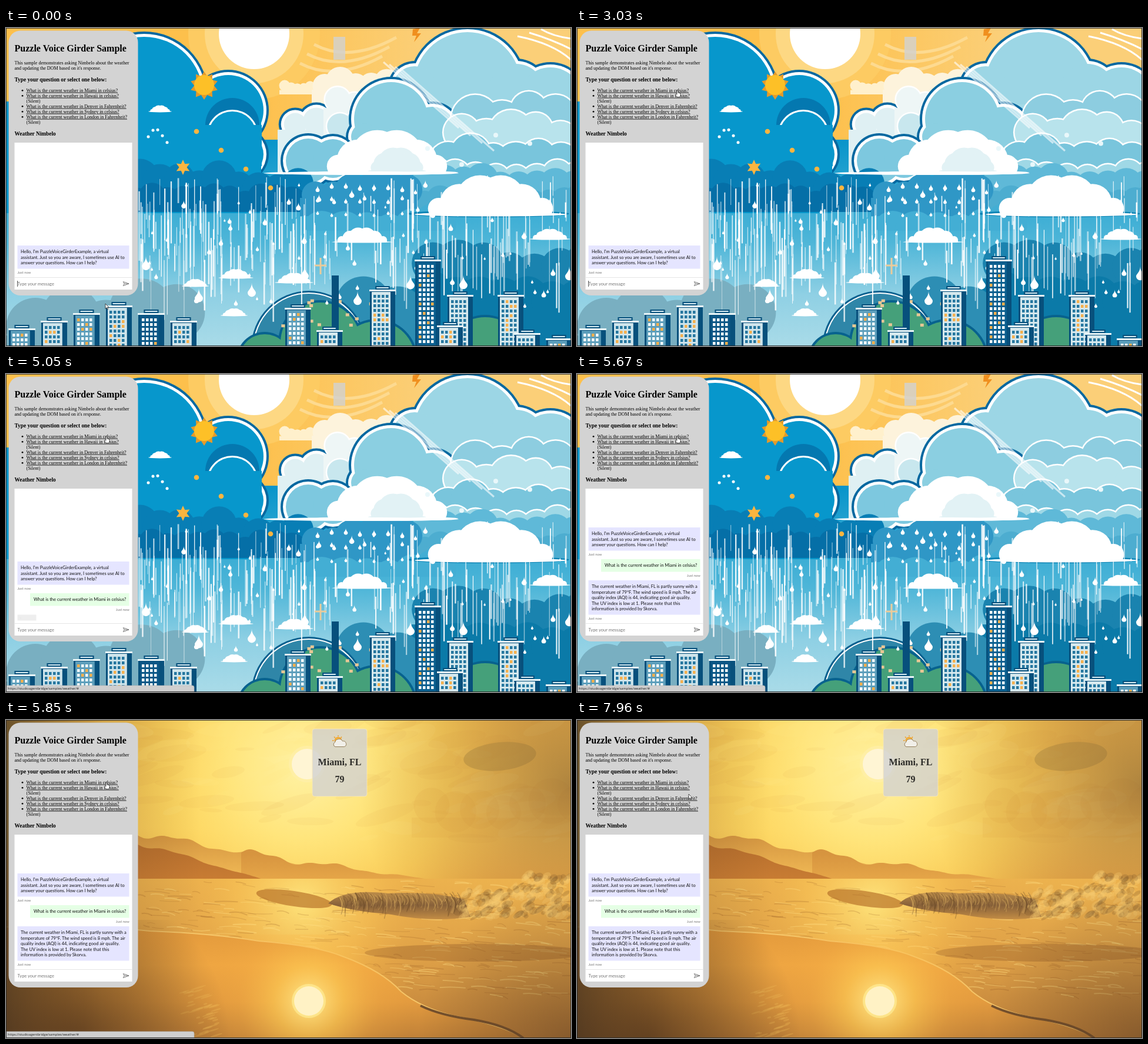
An HTML page with a canvas that plays this animation: 961x541 px, repeating every 8000 ms.

```html
<!DOCTYPE html>
<html lang="en">
<head>
<meta charset="utf-8">
<title>Weather chat sample</title>
<style>
html, body { margin: 0; width: 100%; height: 100%; overflow: hidden; background: #d3d3d3; }
canvas, svg { position: absolute; left: 0; top: 0; width: 961px; height: 541px; }
.serif { font: 8px "Liberation Serif", "Times New Roman", serif; }
.h1 { font-size: 16px; font-weight: bold; }
.h3 { font-size: 9.36px; font-weight: bold; }
.link { text-decoration: underline; }
.chat { font: 7.5px Lato, sans-serif; fill: #111; }
.note { font-size: 5.8px; fill: #767676; }
.hint { fill: #767676; }
.url { font: 5.66px "Open Sans", sans-serif; fill: #222; }
</style>
</head>
<body>
<canvas id="view" width="961" height="541"></canvas>
<svg viewBox="0 0 961 541">
  <defs><clipPath id="log"><rect x="15" y="195" width="199.5" height="229"/></clipPath></defs>
  <rect x="4.5" y="4.5" width="220" height="450.5" rx="20" fill="#d3d3d3"/>
  <g class="serif">
    <text class="h1" x="14.5" y="39.6">Puzzle Voice Girder Sample</text>
    <text x="14.5" y="61.5">This sample demonstrates asking Nimbelo about the weather</text>
    <text x="14.5" y="70.5">and updating the DOM based on it's response.</text>
    <text class="h3" x="14.5" y="90.5">Type your question or select one below:</text>
    <g id="links"></g>
    <text class="h3" x="14.5" y="183.3">Weather Nimbelo</text>
  </g>
  <rect x="14.5" y="195" width="200" height="250" fill="#fff"/>
  <g class="chat">
    <g clip-path="url(#log)">
      <g id="talk">
        <rect x="19.5" y="370" width="190" height="39.5" fill="#e5e5ff"/>
        <text x="25" y="383.1">Hello, I'm PuzzleVoiceGirderExample, a virtual</text>
        <text x="25" y="392.6">assistant. Just so you are aware, I sometimes use AI to</text>
        <text x="25" y="402.1">answer your questions. How can I help?</text>
        <text class="note" x="19.5" y="418">Just now</text>
        <g id="ask">
          <rect x="41" y="424" width="168.5" height="21.5" fill="#e5ffe5"/>
          <text x="47" y="437.3">What is the current weather in Miami in celsius?</text>
          <text class="note" x="209.8" y="454" text-anchor="end">Just now</text>
        </g>
        <g id="typing">
          <rect x="19.5" y="460.5" width="32" height="10" fill="#eee"/>
          <g fill="#d2d2d2"><circle cx="25" cy="466" r="1.5"/><circle cx="35" cy="466" r="1.5"/><circle cx="45" cy="466" r="1.5"/></g>
        </g>
        <g id="reply">
          <rect x="19.5" y="460" width="190" height="58.5" fill="#e5e5ff"/>
          <text x="25" y="473.2">The current weather in Miami, FL is partly sunny with a</text>
          <text x="25" y="482.7">temperature of 79°F. The wind speed is 8 mph. The air</text>
          <text x="25" y="492.2">quality index (AQI) is 44, indicating good air quality.</text>
          <text x="25" y="501.7">The UV index is low at 1. Please note that this</text>
          <text x="25" y="511.2">information is provided by Skorva.</text>
          <text class="note" x="19.5" y="527">Just now</text>
        </g>
      </g>
    </g>
    <path d="M15 424.5H214.5" stroke="#e6e6e6"/>
    <text class="hint" x="19.5" y="437.6">Type your message</text>
    <path d="M199.3 431.6L209 435L199.3 438.6L201.3 435ZM201.3 435H209" fill="none" stroke="#6e6e6e" stroke-width=".9"/>
    <path id="caret" d="M19.5 430V440" stroke="#222" stroke-width=".8"/>
  </g>
  <g id="card">
    <g stroke="#f0a028" stroke-width="1.4">
      <path d="M565 26V28M558 28.5L560 30.5M555 35H557.5M571 28.5L569.5 30.5"/>
      <circle cx="565" cy="35" r="5.5" fill="#fbbd45"/>
    </g>
    <path d="M560 45.5A4 4 0 0 1 559.5 38A7 7 0 0 1 572.5 36A5 5 0 0 1 575.5 45.5Z" fill="#f1efe8" stroke="#8d7550" stroke-width=".9"/>
    <g class="serif" fill-opacity=".8" text-anchor="middle">
      <text class="h1" x="567.5" y="77">Miami, FL</text>
      <text class="h1" x="567.5" y="106">79</text>
    </g>
  </g>
  <g id="status">
    <path d="M0 530H317Q320 530 320 533V541H0Z" fill="#cfcfcf" stroke="#b0b0b0" stroke-width=".6"/>
    <text class="url" x="3" y="537.4">https://studioagentbridge/samples/weather/#</text>
  </g>
  <rect x=".5" y=".5" width="960" height="540" fill="none" stroke="#222" stroke-opacity=".8"/>
  <g id="mouse" fill="#fff" stroke="#111" stroke-width=".7">
    <path id="arrow" d="M0 0V8.5L2 6.7L3.4 9.7L4.7 9.1L3.4 6.2H6Z"/>
    <path id="hand" d="M-1 1Q0 -.7 1 1V5L5 6V10L4 12.4H-1L-4 8Q-3.6 6.4 -1 8Z"/>
  </g>
</svg>
<script>
const W = 961, H = 541, LOOP = 8000;
const { sin, cos, PI, floor, max, min, abs } = Math;
const $ = id => document.getElementById(id);

const links = ['Miami in celsius', 'Hawaii in celsius', 'Denver in Fahrenheit', 'Sydney in celsius', 'London in Fahrenheit'];
let baseline = 108.7;
const line = (s, cls) => {
  const y = baseline;
  baseline += 9;
  return `<text class="${cls}" x="34.5" y="${y}">${s}</text>`;
};
$('links').innerHTML = links.map(s =>
  `<circle cx="28" cy="${baseline - 2.4}" r="1.4"/>` + line(`What is the current weather in ${s}?`, 'link') +
  (/Hawaii|London/.test(s) ? line('(Silent)', '') : '')).join('');

// drawing helpers
let c, seed;
const rnd = () => (seed = (seed * 16807) % 2147483647) / 2147483647;
const span = (a, b) => a + (b - a) * rnd();
const mix = (a, b, p) => a + (b - a) * p;
const times = (n, fn) => { for (let i = 0; i < n; i++) fn(i); };

function scene(draw) {
  const cv = document.createElement('canvas');
  cv.width = W; cv.height = H;
  c = cv.getContext('2d');
  seed = 4711;
  draw();
  return cv;
}
function box(x, y, w, h, fill) { c.fillStyle = fill; c.fillRect(x, y, w, h); }
function oval(x, y, rx, ry, fill, turn = 0) {
  c.fillStyle = fill; c.beginPath(); c.ellipse(x, y, rx, ry, turn, 0, 7); c.fill();
}
const disc = (x, y, r, fill) => oval(x, y, max(r, 0), max(r, 0), fill);
function shape(d, fill, stroke, width = 1) {
  const p = new Path2D(d);
  if (fill) { c.fillStyle = fill; c.fill(p); }
  if (stroke) { c.strokeStyle = stroke; c.lineWidth = width; c.stroke(p); }
}
function ramp(g, cols) {
  cols.forEach((col, i) => g.addColorStop(i / (cols.length - 1), col));
  return g;
}
const down = (y0, y1, ...cols) => ramp(c.createLinearGradient(0, y0, 0, y1), cols);
const across = (x0, x1, ...cols) => ramp(c.createLinearGradient(x0, 0, x1, 0), cols);
const glow = (x, y, r, ...cols) => ramp(c.createRadialGradient(x, y, 0, x, y, r), cols);

// round bumps: each layer is [inset, colour]
function puff(bumps, layers) {
  for (const [inset, col] of layers)
    for (const [x, y, r] of bumps) disc(x, y, r - inset, col);
}
const rim = fill => [[0, '#0568a0'], [4, '#fff'], [9, fill]];
const edged = fill => [[0, '#fff'], [2.5, fill]];
const plain = fill => [[0, fill]];

// row of bumps, solid down to the base
function bank(x0, x1, y, r, layers, base) {
  const bumps = [];
  for (let x = x0 + r; x < x1; x += r * 1.2) bumps.push([x, y + r + span(-.35, .35) * r, r * span(.85, 1.15)]);
  c.save();
  c.beginPath(); c.rect(0, 0, W, base); c.clip();
  puff(bumps, layers);
  box(x0, y + r * 1.5, x1 - x0, H, layers.at(-1)[1]);
  c.restore();
}
// flat-bottomed cloud
function heap(x, base, w, h, fill = '#fff') {
  c.save();
  c.beginPath(); c.rect(0, 0, W, base); c.clip();
  times(6, i => {
    const p = i / 5, r = h * (.26 + .36 * sin(PI * p));
    disc(x + (p - .5) * w * .75, base - r * .6, r, fill);
  });
  c.restore();
  oval(x, base - 1, w * .55, max(1.5, h * .05), fill);
}
function drop(x, y, s) {
  const tip = y - s * 2.4;
  shape(`M${x} ${tip}C${x} ${y - s} ${x + s} ${y - s * .5} ${x + s} ${y}A${s} ${s} 0 0 1 ${x - s} ${y}C${x - s} ${y - s * .5} ${x} ${y - s} ${x} ${tip}Z`, '#fff');
}
function star(x, y, r, n, inner, fill) {
  c.fillStyle = fill;
  c.beginPath();
  times(n * 2, i => {
    const a = i * PI / n - PI / 2, q = i % 2 ? r * inner : r;
    c.lineTo(x + q * cos(a), y + q * sin(a));
  });
  c.fill();
}
function tower(x, y, w, face, pane) {
  box(x - 1, y, w + 2, H, '#07507c');
  box(x + 2, y + 4, w * .78, H, face);
  box(x - 2, y, w + 4, 3, '#eaf6f8');
  box(x + w * .2, y - 6, w * .6, 6, '#07507c');
  box(x + w * .25, y - 4, w * .5, 2, '#d5ebf2');
  for (let yy = y + 9; yy < H - 3; yy += 8)
    for (let xx = x + 5; xx < x + w * .76 - 3; xx += 7)
      box(xx, yy, 4.5, 5, rnd() < .15 ? '#f5b04e' : pane);
}

function rainyCity() {
  // sunny gap
  box(0, 0, W, H, across(420, 720, '#fdc04c', '#fbcf78'));
  disc(422, 10, 112, '#fdcb62');
  disc(422, 10, 84, '#fdd883');
  disc(422, 10, 60, '#fff');
  times(3, i => shape(`M${500 + i * 12} ${60 - i * 16}q60 32 140 -12`, null, '#fdda90', 5));
  shape('M692 2L704 0L699 9H706L694 24L698 13H691Z', '#f08f1e');

  // rain backdrop
  box(0, 190, W, H, down(190, 541, '#0794ca', '#2ea7d2', '#4fb6d8', '#8fd0e4', '#a9dbe8'));

  // pale clouds beside the gap
  bank(465, 560, 92, 9, plain('#fff0cc'), 113);
  bank(520, 700, 72, 22, plain('#fdf3dc'), 190);
  bank(462, 620, 128, 30, rim('#dff0f3'), 248);
  bank(540, 640, 100, 24, edged('#eef6f6'), 240);
  bank(540, 650, 140, 28, edged('#c8e7ee'), 240);

  // large clouds at the right
  puff([[785, 98, 100], [695, 102, 46], [868, 108, 56], [926, 122, 64]], rim('#9cd6e5'));
  box(700, 130, W, 120, '#a3dae7');
  times(3, i => shape(`M${870 + i * 20} ${14 - i * 6}Q930 ${26 - i * 6} 961 ${54 - i * 18}`, null, '#fff', 3));
  puff([[655, 155, 72], [725, 175, 50], [610, 185, 32]], rim('#8bcfe1'));
  times(4, i => bank(760 - i * 20, 1000, 110 + i * 38, 38 - i * 3,
    edged(['#8dcde0', '#b8e3ec', '#79c5dc', '#9fd8e6'][i]), 318));
  bank(690, 1000, 238, 26, plain('#5fb9d8'), 318);
  bank(690, 1000, 275, 22, plain('#4dadd0'), 318);

  // deep blue cloud at the left
  puff([[235, 115, 109], [378, 140, 69], [400, 215, 47]], rim('#0797cc'));
  box(0, 125, 434, 190, '#0797cc');
  puff([[385, 165, 46]], plain('#0478b0'));
  puff([[385, 183, 44]], [[0, '#fff'], [3, '#0797cc']]);
  box(335, 165, 100, 70, '#0797cc');

  puff([[514, 226, 47], [556, 222, 42]], rim('#7dc8df'));
  bank(200, 530, 236, 28, plain('#087eb5'), 313);
  bank(200, 510, 270, 22, plain('#056fa7'), 313);
  bank(500, 700, 250, 26, plain('#2f97c6'), 320);
  bank(505, 730, 306, 32, plain('#43aed4'), 345);

  // white fronts
  heap(648, 247, 220, 76);
  heap(665, 244, 90, 42, '#e2f2f5');
  oval(604, 247, 166, 3, '#fff');
  oval(820, 316, 138, 6, '#0b83b4');
  heap(824, 318, 235, 70);
  times(4, i => shape(`M${642 + i * 10} ${58 + i * 4}L${770 + i * 20} ${170 + i * 13}`, null, 'rgba(255,255,255,.6)', 3));

  // hills
  bank(0, 310, 448, 50, plain('#79afc1'), H);
  bank(690, 1000, 372, 36, plain('#1a83af'), H);
  bank(690, 1000, 425, 34, plain('#0b7aa8'), H);
  bank(560, 700, 430, 48, plain('#2d8eb4'), H);
  puff([[515, 545, 98]], [[0, '#075f8e'], [3, '#fff'], [5, '#2f86a8']]);
  puff([[535, 535, 72], [440, 565, 48], [630, 565, 70], [815, 560, 72]], [[0, '#07628e'], [4, '#45a07a']]);

  // rain, thickest on the left
  times(240, i => {
    const left = i < 140, x = left ? span(224, 525) : span(525, 960), len = span(25, 110);
    box(x, span(250, 400), span(.8, 2.8), len, `rgba(255,255,255,${span(.5, 1)})`);
  });
  times(75, () => drop(span(228, 955), span(265, 475), span(1.5, 4.5)));
  times(9, i => drop(238 + i * 90, 405 + 60 * abs(sin(i * 2)), 7));
  times(7, i => times(3, j => drop(530 + i * 24, 268 + j * 22 + span(0, 8), 3.4 - j * .5)));

  // small clouds and ornaments
  for (const [x, y, w] of [[606, 365, 94], [925, 360, 64], [490, 434, 60], [322, 440, 42], [391, 426, 54], [388, 490, 42], [262, 143, 36]])
    heap(x, y, w, w * .25 + 3);
  times(5, i => disc(242 + i * 8, 185 - 13 * sin(i), 2.5, '#fff'));
  times(4, i => disc(717 + i * 58, 205 + 30 * sin(i * 2), 4, '#e9f7fa'));
  star(337, 98, 24, 10, .7, '#e39a2c');
  disc(337, 97, 17, '#fdc027');
  star(301, 237, 13, 6, .5, '#fbb540');
  times(4, i => disc(324 + i * 42, 176 + i * 32, 4.3, '#fbb540'));
  shape('M535 391V419M525 404H545', null, '#eacb9b', 3);
  times(16, () => box(span(465, 620), span(455, 512), 6, 5, '#e7c795'));

  // skyline
  times(6, i => tower(6 + i * 55, 472 + 13 * abs(i - 3), 42, i === 4 ? '#0b5786' : i % 2 ? '#cfe5ec' : '#5c9ebb', i % 2 ? '#26779f' : '#f2fafa'));
  box(554, 421, 12, H, '#07507c');
  for (const [x, y] of [[476, 476], [530, 514], [620, 445], [697, 394], [752, 454], [735, 506], [838, 454], [866, 519], [920, 528]])
    tower(x, y, 41, y < 400 ? '#0b5f8f' : y % 4 ? '#d6e9ee' : '#5c9ebb', y < 400 || y % 4 === 0 ? '#f2fafa' : '#26779f');

  box(557, 15, 20, 39, 'rgba(211,211,211,.8)');
}

// falling mountain outline
function ridge(x0, x1, top, foot, ...cols) {
  c.fillStyle = down(top, foot, ...cols);
  c.beginPath();
  c.moveTo(x0, foot);
  for (let x = x0; x <= x1; x += 3) {
    const p = (x - x0) / (x1 - x0);
    c.lineTo(x, mix(top, foot, p) - (1 - p) * (7 * sin(x / 21) + 3 * sin(x / 8)));
  }
  c.lineTo(x1, foot);
  c.fill();
}

function sunsetBeach() {
  box(0, 0, W, 275, down(0, 275, '#efbb50', '#f9ca58', '#fbcd5c', '#eeb04c'));
  box(0, 0, W, 275, glow(505, 75, 380, '#fff2a4', '#ffe57c', 'rgba(255,218,96,.6)', 'rgba(250,200,80,0)'));
  times(80, i => {
    const s = span(15, 60);
    oval(span(180, 961), span(0, 215), s, s * span(.15, .4), i % 2 ? 'rgba(255,228,130,.16)' : 'rgba(205,140,55,.07)', span(-.5, .1));
  });
  bank(690, 1000, 115, 34, plain('rgba(222,160,66,.14)'), 200);
  oval(840, 62, 62, 24, 'rgba(178,150,70,.5)', -.1);
  box(560, 0, 401, 275, glow(961, 110, 360, 'rgba(125,85,45,.6)', 'rgba(160,105,50,.3)', 'rgba(170,115,50,0)'));
  disc(512, 75, 31, 'rgba(255,240,170,.7)');
  disc(512, 75, 26, '#fff5d4');

  ridge(120, 650, 172, 272, '#cb8a3a', '#f2bb56');
  ridge(400, 725, 226, 272, '#d6943f', '#e6a648');
  ridge(60, 440, 160, 272, '#9d6430', '#b9702e', '#c87c33');

  // sea
  box(0, 270, W, H, down(270, 541, '#ecb24e', '#dea047', '#bb7e39'));
  box(280, 270, 460, H, glow(505, 310, 230, 'rgba(255,230,125,.95)', 'rgba(252,200,88,.5)', 'rgba(230,160,65,0)'));
  times(420, i => {
    const x = span(220, 950), y = span(274, 470), w = span(10, 45);
    shape(`M${x} ${y}q${w / 2} ${span(-4, 3)} ${w} ${span(0, 5)}`, null,
      i % 2 ? 'rgba(255,222,130,.4)' : 'rgba(140,84,32,.22)', span(.7, 2.2));
  });

  // breaking wave
  oval(490, 304, 65, 13, 'rgba(185,118,44,.7)', .15);
  shape('M548 312Q575 286 650 295Q720 291 779 305L790 335Q725 345 650 330Q590 326 548 312Z', down(290, 340, '#c3924b', '#87613a', '#c58e45'));
  times(130, () => {
    const p = rnd(), x = mix(565, 775, p);
    shape(`M${x} ${span(292, 306)}q${span(4, 12)} 8 ${span(0, 6)} ${span(12, 32)}`, null, `rgba(${rnd() < .5 ? '242,195,105' : '100,68,36'},.3)`, 1.5);
  });
  times(260, i => {
    const p = rnd(), top = 300 - 45 * p - 10 * sin(p * 12);
    oval(mix(770, 960, p), mix(top, 335, rnd()), span(3, 12), span(2, 7),
      i % 3 ? 'rgba(244,202,112,.3)' : 'rgba(125,86,42,.25)', -.6);
  });
  oval(800, 396, 190, 15, 'rgba(140,88,38,.35)');

  // wet sand
  const shore = 'M0 352Q170 350 245 359Q350 363 430 376Q530 384 575 403Q640 427 672 462Q705 489 760 503Q845 519 880 541';
  shape(shore + 'H0Z', down(355, 541, '#e39a3c', '#efa642', '#e39b3f', '#c08138'), '#f6c669', 2);
  box(250, 365, 450, 176, glow(515, 478, 180, '#ffe98f', 'rgba(255,205,85,.6)', 'rgba(250,180,70,.2)', 'rgba(240,165,60,0)'));
  shape('M705 486Q740 503 796 510Q850 519 880 541', null, '#75502c', 4);
  times(40, () => oval(span(300, 360), span(455, 541), span(3, 15), 1.5, 'rgba(255,205,95,.25)', -.3));
  disc(515, 478, 29, 'rgba(255,237,150,.7)');
  disc(515, 478, 25, '#fff2c5');

  // darker edges
  box(0, 0, 330, H, across(0, 330, 'rgba(60,45,30,.75)', 'rgba(95,62,30,.22)', 'rgba(100,62,28,0)'));
  box(0, 340, 420, 201, glow(120, 541, 260, 'rgba(70,45,25,.65)', 'rgba(70,45,25,0)'));
  box(680, 300, 281, 241, glow(961, 541, 260, 'rgba(85,56,32,.5)', 'rgba(85,56,32,0)'));

  c.beginPath(); c.roundRect(521, 15, 93, 115, 4);
  c.fillStyle = 'rgba(211,211,211,.8)'; c.fill();
  c.strokeStyle = 'rgba(255,235,180,.7)'; c.lineWidth = 1; c.stroke();
}

const rainy = scene(rainyCity), sunset = scene(sunsetBeach);
const view = $('view').getContext('2d');
const dots = [...document.querySelectorAll('#typing circle')];

const within = (t, a, b) => t >= a && t < b;
const show = (id, on) => $(id).style.display = on ? '' : 'none';
function ease(t, a, b) {
  const p = min(1, max(0, (t - a) / (b - a)));
  return p * p * (3 - 2 * p);
}
const bezier = (a, b, d, e, p) => a.map((v, i) => {
  const q = 1 - p;
  return v * q ** 3 + 3 * b[i] * q * q * p + 3 * d[i] * q * p * p + e[i] * p ** 3;
});

function pointer(t) {
  const start = [169, 469], rest = [240, 510], link = [171, 105], end = [190, 126];
  if (t < 2130) return bezier(start, start, rest, rest, ease(t, 70, 270));
  if (t < 6990) return bezier(rest, [300, 300], [270, -130], link, ease(t, 2130, 2930));
  return bezier(link, [250, 140], [270, 165], end, ease(t, 6990, 7960));
}

function frame() {
  const t = performance.now() % LOOP;
  view.fillStyle = '#d3d3d3';
  view.fillRect(0, 0, W, H);
  if (t < 5800) view.drawImage(rainy, 0, 0);
  else if (t >= 5850) view.drawImage(sunset, 0, 0);

  const hand = within(t, 2960, 7080), replied = t >= 5670;
  show('card', t >= 5800);
  show('ask', t >= 3230);
  show('typing', within(t, 3600, 5670));
  show('reply', replied);
  show('caret', t < 3230 && floor((t + 395) / 532) % 2 === 0);
  show('status', within(t, 3300, 7250) || within(t, 7600, 7880));
  show('hand', hand);
  show('arrow', !hand);

  const scroll = replied ? -109 : -36 * ease(t, 3230, 3480) - 15 * ease(t, 3600, 3770);
  $('talk').setAttribute('transform', `translate(0 ${scroll})`);
  $('mouse').setAttribute('transform', `translate(${pointer(t).join(' ')})`);
  dots.forEach((d, i) => d.style.opacity = t < 4040 ? 0 : max(0, sin((t - 4040) / 500 * 2 * PI - i)));
  requestAnimationFrame(frame);
}
frame();
</script>
</body>
</html>
```
